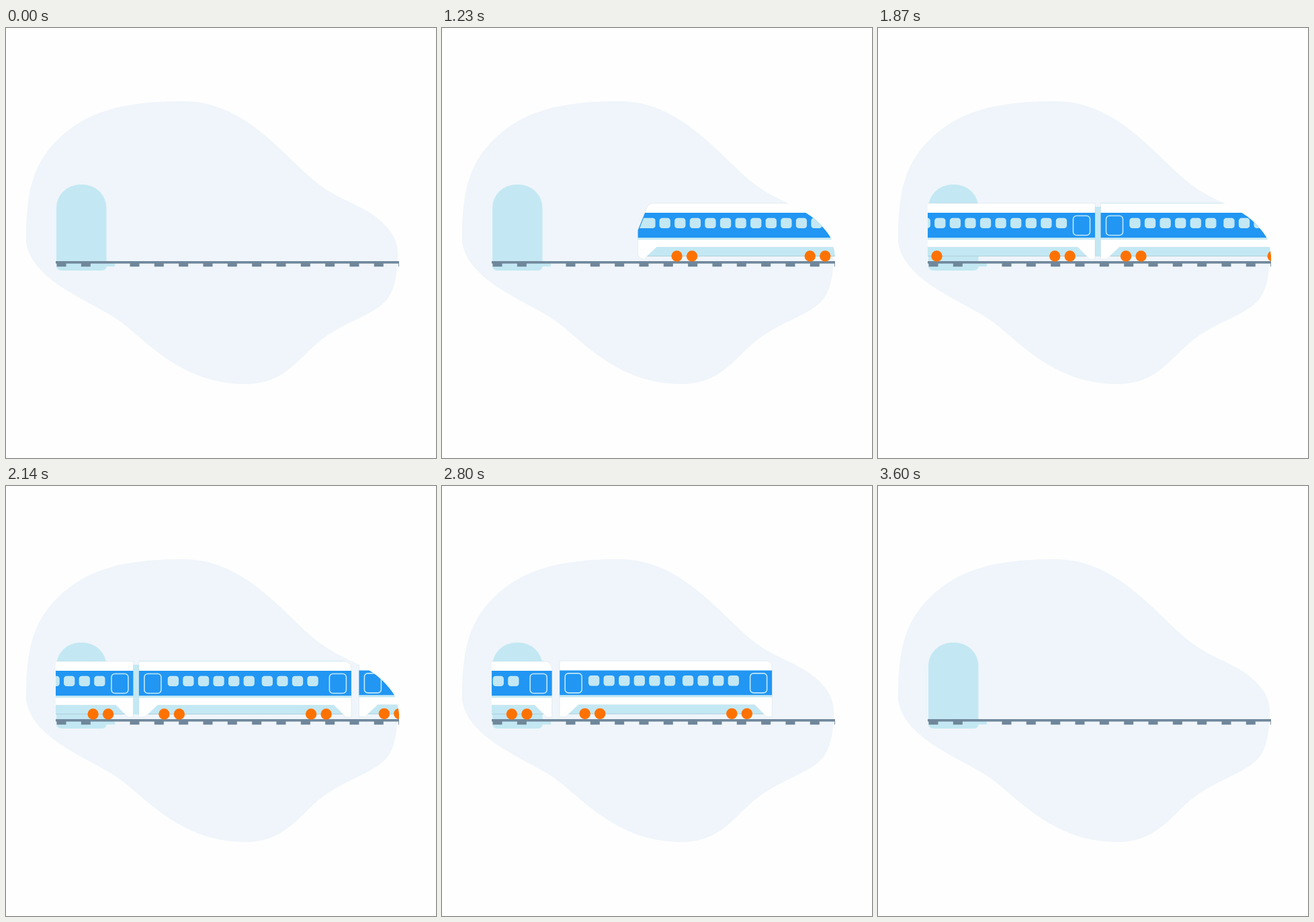
An HTML page that plays this animation: 640x640 px, repeating every 4.03 s.

```html
<!DOCTYPE html>
<html lang="en">
<head>
<meta charset="utf-8">
<title>Train</title>
<style>
  html, body { margin: 0; width: 100%; height: 100%; overflow: hidden; background: #fefefe; }
  svg { display: block; width: 100vw; height: 100vh; }
</style>
</head>
<body>
<svg viewBox="0 0 640 640">
  <defs>
    <clipPath id="view">
      <path d="M74 255H461V229C500 261 541 264 569 299C575 306 578 311 580 315L583 326L585 339V349H74Z"/>
    </clipPath>
  </defs>
  <path fill="#eff5fa" d="M30 318C29 240 43 200 76 167C122 121 182 109 265 109C355 109 413 190 461 229C500 261 541 264 569 299C580 312 583 324 583 336C583 352 582 384 568 403C549 427 507 436 472 462C437 488 417 530 356 530C298 530 254 506 215 474C193 456 178 441 157 428C112 401 37 372 30 318Z"/>
  <path fill="#c3e8f3" d="M75 268A35 35 0 0 1 110 233H114.500A35 35 0 0 1 149.500 268V350H162V355H149.500Q149 361 142 361H83Q75 361 75 353Z"/>
  <g id="track" fill="#70879b"><rect x="74" y="347" width="511" height="3.600"/></g>
  <g clip-path="url(#view)"><g id="train"></g></g>
</svg>
<script>
const NS = 'http://www.w3.org/2000/svg';
const PALE = '#c3e8f3', BLUE = '#2196f3', ORANGE = '#ff7200', RAIL = '#70879b';
const LOOP = 4030;
const train = document.getElementById('train');
const track = document.getElementById('track');

function add(parent, tag, attrs) {
  const el = document.createElementNS(NS, tag);
  for (const key in attrs) el.setAttribute(key, attrs[key]);
  return parent.appendChild(el);
}

function rect(parent, x, y, width, height, fill, rx = 0) {
  return add(parent, 'rect', { x, y, width, height, fill, rx });
}

// Sleepers, with one hidden by the tunnel ledge
for (let i = 0; i < 15; i++) {
  const x = 75.5 + i * 36.33;
  if (i !== 2) rect(track, x, 350, Math.min(14, 585 - x), 5.2, RAIL);
}

function addCar(x, y, { nose = false, corner = 0, topLine = false }) {
  const car = add(train, 'g', { transform: `translate(${x} ${y})` });
  const end = 316;
  const front = nose
    ? 'M9 344.500Q0 343 0 335V303Q0 300 1 298L13 268Q16 261 22 261'
    : 'M9 344H0V261';
  add(car, 'path', {
    d: `${front}H${end - corner}Q${end} 261 ${end} ${261 + corner}V344H308L290 326H28Z`,
    fill: '#fff', stroke: RAIL, 'stroke-width': 0.5, 'stroke-opacity': 0.22
  });
  if (topLine) rect(car, 0, 260.4, end - corner, 0.7, PALE);
  add(car, 'path', {
    d: nose ? `M10.500 275H${end}V312H0V301Z` : `M0 275H${end}V312H0Z`,
    fill: BLUE
  });
  rect(car, 0, 312, end, 3, PALE);
  add(car, 'path', { d: 'M28 326H290L304 340H13Z', fill: PALE });
  rect(car, 14, 339.3, 289, 0.7, '#a5c4cf');

  const pane = px => rect(car, px, 282.7, 16.3, 15.4, PALE, 4.2);
  if (nose) {
    add(car, 'path', { d: 'M8.500 282.700H21.500Q26 282.700 26 287V294Q26 298.100 21.500 298.100H2.500Z', fill: PALE });
    for (let i = 0; i < 11; i++) pane(32 + i * 22.58);
  } else {
    for (let i = 0; i < 6; i++) pane(42.8 + i * 22.58);
    for (let i = 0; i < 4; i++) pane(182.8 + i * 22.58);
  }

  for (const dx of nose ? [283.5] : [8, 283.5]) {
    add(car, 'rect', {
      x: dx, y: 279.5, width: 25, height: 29, rx: 5,
      fill: 'none', stroke: PALE, 'stroke-width': 1.6
    });
  }
  const shift = nose ? 20.5 : 0;
  for (const cx of [37.5 + shift, 60 + shift, 256.2, 278.7]) {
    add(car, 'circle', { cx, cy: 339.5, r: 8.2, fill: ORANGE });
  }
}

rect(train, 315, 266, 10, 74, PALE);
addCar(0, 0, { nose: true });
addCar(324.5, 0, { corner: 12, topLine: true });
addCar(652, -0.6, { corner: 8 });

// Nose position over time: [ms, x]
const path = [
  [0, 584.5], [530, 520], [830, 434], [1070, 352], [1230, 292], [1630, 120],
  [1870, 7.5], [2400, -258.5], [2800, -476.3], [3240, -718], [3600, -898]
];

function slope(i) {
  if (i === 0) return 0;
  const a = path[i - 1], b = path[Math.min(i + 1, path.length - 1)];
  return (b[1] - a[1]) / (b[0] - a[0]);
}

function noseX(t) {
  const last = path.length - 1;
  if (t >= path[last][0]) return path[last][1];
  let i = 0;
  while (t >= path[i + 1][0]) i++;
  const [t0, x0] = path[i], [t1, x1] = path[i + 1];
  const h = t1 - t0, s = (t - t0) / h, r = 1 - s;
  return r * r * (1 + 2 * s) * x0 + s * s * (3 - 2 * s) * x1
    + h * s * r * (r * slope(i) - s * slope(i + 1));
}

function draw(t) {
  train.setAttribute('transform', `translate(${noseX(t).toFixed(2)} 0)`);
}

const start = performance.now();
function tick() {
  draw((performance.now() - start) % LOOP);
  requestAnimationFrame(tick);
}
draw(0);
requestAnimationFrame(tick);
</script>
</body>
</html>
```
